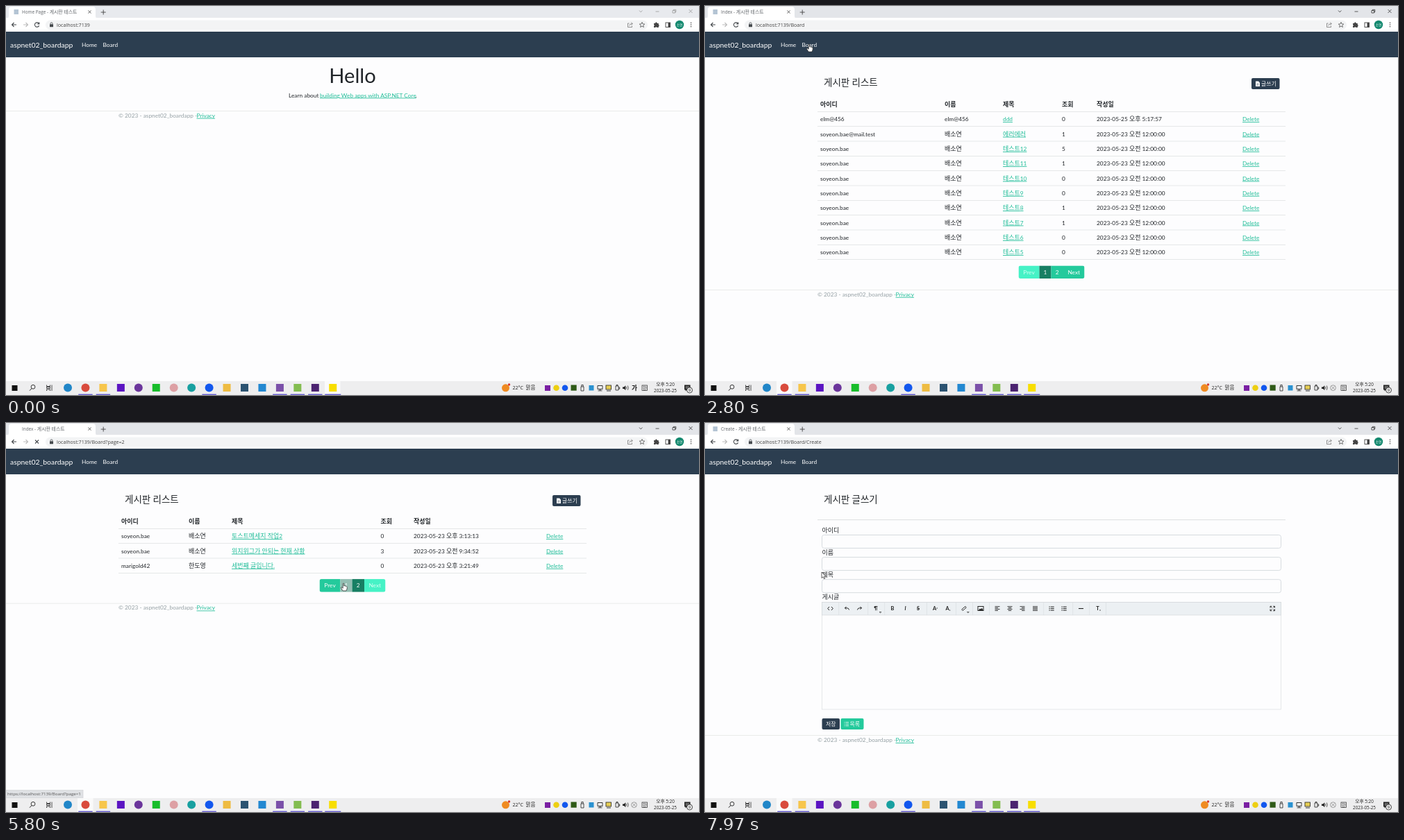
These frames come from a looping animation (998x561 px, 8000 ms). An HTML page:

```html
<!DOCTYPE html>
<html lang="ko">
<head>
<meta charset="utf-8">
<title>Board</title>
<style>
  html, body { margin: 0; width: 100%; height: 100%; overflow: hidden; background: #fdfdfe; }
  svg { display: block; width: 100%; height: 100%; }
  text { font-family: Lato, "Noto Sans CJK KR", "Noto Sans CJK", sans-serif; white-space: pre; }
  .ui { font-family: "Open Sans", "Noto Sans CJK KR", "Noto Sans CJK", sans-serif; }
  .ko { font-size: 1.08em; }
  .link { text-decoration: underline; }
</style>
</head>
<body>
<svg viewBox="0 0 998 561">
  <g id="screen"></g>
  <g id="cursor" stroke="#222" stroke-width=".7" stroke-linejoin="round" fill="#fff">
    <path id="arrow" d="M0 0V8.6L2 6.8L3.4 9.8L4.8 9.2L3.5 6.2H6.2Z"/>
    <path id="hand" d="M-.8 .6Q0-.7 .8 .6V4Q1.6 3.2 2.4 4.2Q3.3 3.5 3.9 4.5Q5.1 4.2 5.2 5.6V8L4 11H-.8L-3.5 7Q-3.8 5.5-2.4 6L-.8 7.3Z"/>
  </g>
</svg>
<script>
const LOOP = 8000, DARK = '#2c3e50', GREEN = '#24ca9c', PALE = '#46f2c6', DEEP = '#177f63', LINK = '#1fbd98';
const $ = id => document.getElementById(id);

const rect = (x, y, w, h, fill, extra = '') =>
  `<rect x="${x}" y="${y}" width="${w}" height="${h}" fill="${fill}" ${extra}/>`;
const disc = (x, y, r, fill, extra = '') => `<circle cx="${x}" cy="${y}" r="${r}" fill="${fill}" ${extra}/>`;
const line = (d, color = '#333', width = 1) =>
  `<path d="${d}" fill="none" stroke="${color}" stroke-width="${width}"/>`;
const text = (x, y, s, size = 8.32, fill = '#212529', extra = '') =>
  `<text x="${x}" y="${y}" font-size="${size}" fill="${fill}" ${extra}>` +
  s.replace(/[가-힣]+/g, '<tspan class="ko">$&</tspan>') + '</text>';
const ui = (x, y, s, size, fill, extra = '') => text(x, y, s, size, fill, 'class="ui" ' + extra);
const link = (x, y, s) => text(x, y, s, 8.32, LINK, 'class="link"');
const MID = 'text-anchor="middle"', BOLD = 'font-weight="700"';

function browser(s) {
  const control = s.active ? '#333' : '#999', ink = '#45494d';
  let out = rect(0, 0, 998, 18, s.active ? '#e3e5e9' : '#e8eaee')
    + '<path d="M1 18Q4 18 4 14V5Q4 1 8 1H125Q129 1 129 5V14Q129 18 132 18Z" fill="#fff"/>'
    + rect(0, 17, 998, 20, '#fff') + rect(57, 20.5, 867, 13.5, '#f3f4f5', 'rx="6.7"')
    + (s.loading ? '' : rect(11.5, 5, 6.5, 7, '#b4c4d4'))
    + `<svg width="114" height="18">${ui(23, 11, s.title, 6.4, '#5f6368')}</svg>`
    + line('M118.5 6.5l4 4m0-4l-4 4M140.2 5.5v7m-3.5-3.5h7', '#444', .9)
    + line('M912 6.5l2.2 2.3 2.2-2.3M935.5 8h5M960 6.5h3.5v3.5h-3.5zM961.2 6.5v-1.2h3.6v3.5h-1.3M983.5 5l5 5m0-5l-5 5', control, .8)
    + line('M15 27H8.5m3-3l-3 3 3 3', ink, 1.1) + line('M25 27h6.5m-3-3l3 3-3 3', '#bbb', 1.1)
    + (s.loading ? line('M42 24.5l5 5m0-5l-5 5', ink, 1.1)
                 : line('M47.4 25.5A3.2 3.2 0 1 0 47.6 28.2M47.8 23.5v2.5h-2.6', ink, 1.1))
    + rect(63, 26.2, 5, 4, ink, 'rx=".5"') + line('M64 26.5v-1.2a1.5 1.5 0 0 1 3 0v1.2', ink, .8)
    + ui(73, 29.6, 'localhost:7139' + s.path, 7.1, '#444')
    + line('M897.5 25h-2v5.5h6v-2M897.5 28.5q.5-3 4.5-3m-1.7-2l2 2-2 2', '#666', .7)
    + line('M916 23.4l1.1 2.5 2.7.2-2.1 1.8.7 2.6-2.4-1.4-2.4 1.4.7-2.6-2.1-1.8 2.7-.2z', '#555', .8)
    + '<path d="M933 25h2a1.4 1.4 0 0 1 2.8 0h2v2a1.4 1.4 0 0 1 0 2.6v1.4h-2.3a1.2 1.2 0 0 0-2.3 0H933v-2a1.3 1.3 0 0 0 0-2.3z" fill="#444"/>'
    + rect(950, 24, 6.5, 6.5, 'none', 'stroke="#444" stroke-width=".9"') + rect(953.5, 24, 3, 6.5, '#444')
    + disc(970, 27, 6.2, '#14896f') + ui(970, 28.7, '소연', 4.2, '#fff', MID);
  for (const y of [24.3, 27, 29.7]) out += disc(986.5, y, .8, '#444');
  return out + rect(0, 37, 998, 37, DARK)
    + text(6, 59.6, 'aspnet02_boardapp', 10.4, '#fff')
    + text(109, 58.8, 'Home', 8.32, '#fff') + text(139.4, 58.8, 'Board', 8.32, '#fff');
}

function footer(y) {
  return rect(0, y, 998, .7, '#e3e4e2')
    + text(162, y + 9.7, '© 2023 - aspnet02_boardapp - ', 8.32, '#95a0a4') + link(274.5, y + 9.7, 'Privacy');
}

const home = () => text(499, 111, 'Hello', 29.1, '#212529', MID)
  + text(407, 131.5, 'Learn about ') + link(452, 131.5, 'building Web apps with ASP.NET Core')
  + text(589.6, 131.5, '.') + footer(151);

const USER = ['soyeon.bae', '배소연'], MIDNIGHT = '2023-05-23 오전 12:00:00';
const views = [5, 1, 0, 0, 1, 1, 0, 0];
const lists = {
  1: {
    columns: [166, 345, 429, 514, 564, 774],
    rows: [
      ['elm@456', 'elm@456', 'ddd', '0', '2023-05-25 오후 5:17:57'],
      ['soyeon.bae@mail.test', '배소연', '에러에러', '1', MIDNIGHT],
      ...views.map((n, i) => [...USER, '테스트' + (12 - i), '' + n, MIDNIGHT])
    ]
  },
  2: {
    columns: [166, 263, 325, 539.5, 587, 778],
    rows: [
      [...USER, '토스트메세지 작업2', '0', '2023-05-23 오후 3:13:13'],
      [...USER, '위지위그가 안되는 현재 상황', '3', '2023-05-23 오전 9:34:52'],
      ['marigold42', '한도영', '세번째 글입니다.', '0', '2023-05-23 오후 3:21:49']
    ]
  }
};

function pager(y, page, hover, pressed) {
  const fills = [page == 1 ? PALE : GREEN, page == 1 ? DEEP : GREEN, page == 2 ? DEEP : GREEN, page == 2 ? PALE : GREEN];
  if (hover) fills[hover] = pressed ? '#93bfb3' : DEEP;
  const edges = [451.5, 481.5, 498.5, 516, 546.5];
  return '<clipPath id="pill">' + rect(451.5, y, 95, 18.7, '#000', 'rx="3"') + '</clipPath><g clip-path="url(#pill)">'
    + ['Prev', '1', '2', 'Next'].map((label, i) => rect(edges[i], y, edges[i + 1] - edges[i], 18.7, fills[i])
      + text((edges[i] + edges[i + 1]) / 2, y + 12.3, label, 8.32, fills[i] == PALE ? '#d5fff3' : '#fff', MID)).join('') + '</g>';
}

function list(page, s) {
  const { columns, rows } = lists[page], step = 21.33, bottom = 152.4 + step * rows.length;
  let out = text(171, 115.4, '게시판 리스트', 12.5)
    + rect(787, 104, 40.5, 16, DARK, 'rx="2"')
    + '<path d="M793 108.5h4l2 2v5.5h-6z" fill="#fff"/>' + line('M794.3 112.2h3.2m-3.2 1.8h3.2', DARK, .6)
    + text(801, 114.7, '글쓰기', 7.28, '#fff') + rect(162, 152, 674, .7, '#dcdfe0');
  ['아이디', '이름', '제목', '조회', '작성일'].forEach((h, i) => out += text(columns[i], 144.9, h, 8.32, '#212529', BOLD));
  rows.forEach((row, r) => {
    const y = 166.2 + step * r;
    row.forEach((cell, i) => out += i == 2 ? link(columns[i], y, cell) : text(columns[i], y, cell));
    out += link(columns[5], y, 'Delete') + rect(162, 152 + step * (r + 1), 674, .7, '#dcdfe0');
  });
  return out + pager(bottom + 8.7, page, s.hover, s.loading) + footer(bottom + 43.4);
}

function toolbar() {
  const ink = '#222';
  let out = rect(168.5, 258.5, 661, 18.5, '#ecf0f3', 'stroke="#d3d7da" stroke-width=".7"');
  for (const x of [192.5, 234.5, 258.5, 319, 361, 385, 409, 487.5, 529.5, 553.5, 577]) out += rect(x, 259, .6, 18, '#d8dcdf');
  const glyph = (x, s, extra = '') => text(x, 270.2, s, 7.4, ink, `${MID} ${BOLD} ${extra}`);
  out += glyph(246, '¶') + glyph(270, 'B') + glyph(288.5, 'I', 'font-style="italic"') + glyph(307, 'S', 'text-decoration="line-through"')
    + glyph(330.5, 'A') + glyph(349, 'A') + glyph(565.5, 'T')
    + text(333, 267.5, 'a', 3.8, ink) + text(351.5, 271.3, 'a', 3.8, ink) + text(568, 271.3, 'x', 4, ink)
    + line('M179 265l-2.3 2.5 2.3 2.5M182 265l2.3 2.5-2.3 2.5', ink)
    + line('M203.5 264.8l-2 2 2 2M201.5 266.8h3q2.5 0 3 2.7M223.5 264.8l2 2-2 2M225.5 266.8h-3q-2.5 0-3 2.7', ink)
    + line('M251 272.5h3l-1.5 1.4zM377.3 272.5h3l-1.5 1.4z', ink, .6)
    + line('M372 267l2-2q1.3-.8 2 .5t-2 2.5M374 268l-2 2q-1.5 .8-2-.5t2-2.5', ink, .9)
    + rect(393, 264.5, 8, 6, 'none', `stroke="${ink}"`) + `<path d="M394 270l2-2.5 1.3 1.2 1.3-2 2 3.3z" fill="${ink}"/>`;
  [421, 439, 457, 475.5].forEach((x, i) => {
    for (let k = 0; k < 4; k++) {
      const w = k % 2 && i < 3 ? 4.5 : 7;
      out += rect(x - 3.5 + (7 - w) * [0, .5, 1, 0][i], 264.3 + k * 1.9, w, .9, ink);
    }
  });
  for (const x of [499, 517])
    for (let k = 0; k < 3; k++) out += rect(x - 3.5, 264.5 + k * 2.5, 1.2, 1.2, ink) + rect(x - 1.3, 264.6 + k * 2.5, 5, 1, ink);
  return out + rect(538, 267, 7, 1.1, ink)
    + line('M814 266.5v-2.2h2.2m2 0h2.3v2.2m0 2v2.3h-2.3m-2 0h-2.2v-2.3M814.3 264.5l2 2m4-2l-2 2m2 4l-2-2m-4 2l2-2', ink, .9);
}

function create(editor) {
  const border = 'stroke="#cdd3d8" stroke-width=".8" rx="3"', y = editor ? 426 : 402;
  let out = text(171, 115.4, '게시판 글쓰기', 12.5) + rect(162, 139.4, 674, .7, '#d0d2d4');
  ['아이디', '이름', '제목', '게시글'].forEach((label, i) => {
    out += text(168.5, 158 + 32.1 * i, label);
    if (i < 3) out += rect(168.5, 161.5 + 32.1 * i, 661, 19, '#fdfdfe', border);
  });
  out += editor
    ? rect(168.5, 258.5, 661, 154.5, '#fdfdfe', 'stroke="#dadde0" stroke-width=".7"') + toolbar()
    : rect(168.5, 258, 661, 131.5, '#fdfdfe', border) + line('M824.5 388.5l4-4m-1.8 4l1.8-1.8', '#888', .6);
  return out + rect(168.5, y, 25.5, 16, DARK, 'rx="2"') + text(181.3, y + 10.7, '저장', 7.28, '#fff', MID)
    + rect(195.5, y, 33, 16, GREEN, 'rx="2"') + text(208.5, y + 10.7, '목록', 7.28, '#fff')
    + line(`M200.5 ${y + 5.7}h1m1 0h4.5m-6.5 2.5h1m1 0h4.5m-6.5 2.5h1m1 0h4.5`, '#fff', .8)
    + footer(y + 24.3);
}

// Taskbar marks: shape (c = disc, s = square), colour, running or not.
const apps = ['c#2186c8', 'c#d94b3d_', 's#f7c64b_', 's#5b14c2', 'c#6b359b', 's#18bd2b', 'c#dda0a4', 'c#18a0a0',
  'c#1257ee_', 's#eebc42', 's#2c5371', 's#2388d1', 's#7b50a9_', 's#83bd50_', 's#4b2370_', 's#f8de00_'];

function taskbar(s) {
  const ink = '#222';
  let out = rect(0, 541, 998, 20, '#eeeeef') + rect(s.active ? 103 : 459, 541, 22.5, 20, '#fafafa')
    + rect(8.5, 547, 8, 8, '#111')
    + disc(39, 549.3, 2.9, 'none', `stroke="${ink}" stroke-width=".9"`) + line('M37 551.5l-3 3.2', ink)
    + line('M58.5 546.5v2h5v-2M58.5 555v-2h5v2M58.5 549.5h5v2h-5zM66 546.5v8.5', ink, .8);
  apps.forEach((app, i) => {
    const x = 89 + 25.45 * i, color = app.slice(1, 8);
    out += app[0] == 'c' ? disc(x, 550.5, 6, color) : rect(x - 5.5, 545, 11, 11, color);
    if (app.endsWith('_')) {
      const half = i == 15 ? 11.5 : 10.2;
      out += rect(x - half, 559.6, 2 * half, 1.4, '#685fd0');
    }
  });
  out += disc(719.5, 550.8, 5.5, '#ef8b22') + disc(724.5, 546, 1.7, '#d83a2e')
    + ui(729.5, 553.3, '22°C  맑음', 7, ink)
    + rect(776, 547, 8, 8, '#7a1fa2') + disc(792.5, 550.7, 4.3, '#edcf12') + disc(805, 550.7, 4.3, '#1257ee')
    + rect(813.5, 546.5, 8.2, 8.2, '#2f5a17')
    + line('M828 549h4v6h-4zM828.8 549v-2.5h2.4v2.5', ink, .8) + rect(839.5, 547, 7, 7.5, '#2a91d0')
    + line('M852 547.5h7v5h-7zM855.5 552.5v2.3m-3 0h6', ink, .9)
    + rect(864, 547, 7.5, 6, '#e5cd54', `stroke="${ink}" stroke-width=".8"`) + line('M865 555h6', ink, .9)
    + line('M878 548h4v6h-4zM882 550h1.7v2.2h-1.7M879 548v-1.5h2v1.5', ink, .8)
    + `<path d="M888 549.5h2l2.3-2.3v7l-2.3-2.3h-2z" fill="${ink}"/>` + line('M893.5 549q1 1.7 0 3.4M895.3 547.5q2 3.2 0 6.4', ink, .7)
    + (s.active ? disc(904.5, 550.7, 3.9, 'none', 'stroke="#777" stroke-width=".7"') + line('M902.5 548.7l4 4m0-4l-4 4', '#777', .7)
                : ui(905, 553.6, '가', 8, '#111', MID + ' ' + BOLD))
    + rect(916, 547, 7.5, 7.5, 'none', `stroke="${ink}" stroke-width=".7"`) + ui(919.8, 552.9, '한', 5.6, ink, MID)
    + ui(949.5, 548, '오후 5:20', 6.3, ink, MID) + ui(949.5, 557.2, '2023-05-25', 6.3, ink, MID)
    + '<path d="M977 546.5h8.5v7h-5l-2 2v-2h-1.500z" fill="#222"/>' + line('M978.5 549h5.5m-5.500 2h4', '#fff', .6)
    + disc(984.5, 554, 4, '#eee', `stroke="${ink}" stroke-width=".8"`) + ui(984.5, 556.2, '9', 6, ink, MID);
  return out;
}

const SITE = ' - 게시판 테스트', HOST = 'https://localhost:7139';
const within = (t, ...spans) => spans.some(([a, b]) => t >= a && t < b);

function stateAt(t) {
  const s = { active: t >= 2550, loading: within(t, [2560, 2700], [3950, 4150], [5740, 5900], [6560, 6950]), hover: 0, status: '' };
  if (t < 2700) Object.assign(s, { page: 'home', title: 'Home Page' + SITE, path: '' });
  else if (t < 4150) Object.assign(s, { page: 'first', title: 'Index' + SITE, path: '/Board' });
  else if (t < 5900) Object.assign(s, { page: 'second', title: 'Index' + SITE, path: '/Board?page=2' });
  else if (t < 6680) Object.assign(s, { page: 'first', title: 'Index' + SITE, path: '/Board?page=1' });
  else Object.assign(s, s.loading
    ? { page: 'form', title: HOST + '/Board/Create', path: '/Board/Create' }
    : { page: 'editor', title: 'Create' + SITE, path: '/Board/Create' });
  if (within(t, [3330, 4150])) s.hover = 2;
  if (within(t, [5620, 5900])) s.hover = 1;
  if (within(t, [2400, 2750])) s.status = '/Board';
  if (within(t, [3330, 4230])) s.status = '/Board?page=2';
  if (within(t, [5630, 5930])) s.status = '/Board?page=1';
  if (within(t, [6430, 6960])) s.status = '/Board/Create';
  return s;
}

const pages = { home, first: s => list(1, s), second: s => list(2, s), form: () => create(false), editor: () => create(true) };

function status(path) {
  if (!path) return '';
  const width = { '/Board': 84, '/Board/Create': 107 }[path] || 111;
  return rect(-1, 529.5, width + 1, 11.5, '#dfe1e4', 'stroke="#c9cbce" stroke-width=".5"') + ui(2, 537.3, HOST + path, 6.16, '#555');
}

// Pointer stops: time, x, y.
const stops = [[1500, 470, 552], [2250, 175, 66], [2290, 175, 66], [2450, 150, 55], [2800, 150, 55], [3430, 506, 382], [4200, 506, 382],
  [4500, 503, 347], [4900, 503, 347], [5680, 486, 231], [5930, 486, 231], [6460, 802, 111], [7380, 802, 111], [7960, 168, 215]];

function pointerAt(t) {
  const i = stops.findIndex(p => p[0] > t);
  if (i < 1) return stops[stops.length - 1].slice(1);
  const [t0, x0, y0] = stops[i - 1], [t1, x1, y1] = stops[i];
  const u = (t - t0) / (t1 - t0), e = u * u * (3 - 2 * u);
  const sag = t0 == 7380 ? 75 * Math.sin(Math.PI * e) : 0;
  return [x0 + (x1 - x0) * e, y0 + (y1 - y0) * e + sag];
}

let shown = '';
function frame(now) {
  const t = now % LOOP, s = stateAt(t), key = JSON.stringify(s);
  if (key != shown) {
    shown = key;
    $('screen').innerHTML = rect(0, 0, 998, 561, '#fdfdfe') + browser(s) + pages[s.page](s) + status(s.status) + taskbar(s);
  }
  const hand = within(t, [2400, 2830], [3330, 4230], [5620, 5960], [6430, 7400]);
  $('cursor').setAttribute('visibility', t < stops[0][0] ? 'hidden' : 'visible');
  $('cursor').setAttribute('transform', `translate(${pointerAt(t)})`);
  $('arrow').style.display = hand ? 'none' : '';
  $('hand').style.display = hand ? '' : 'none';
  requestAnimationFrame(frame);
}
frame(0);
</script>
</body>
</html>
```
